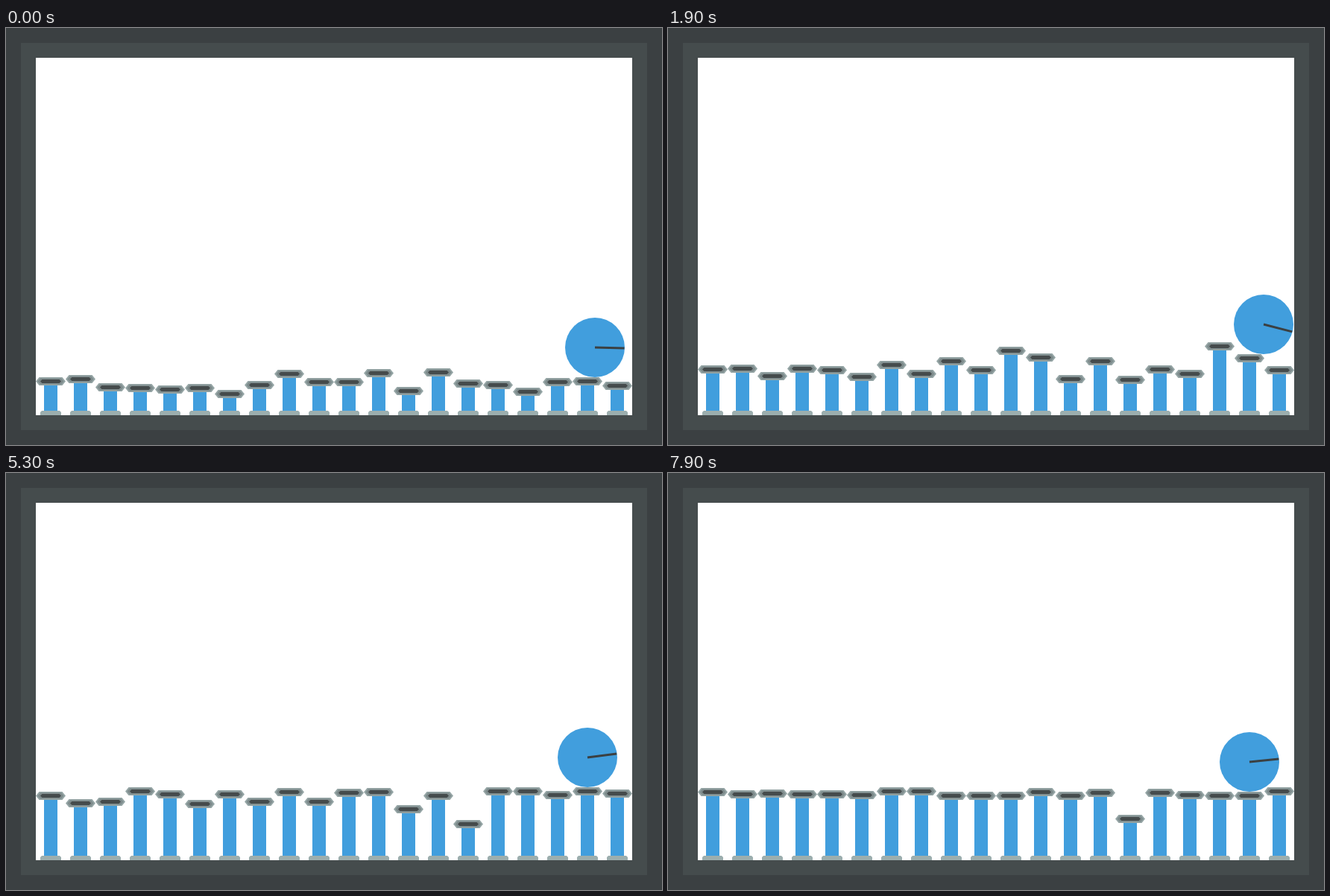
Write an HTML page that moves like this. It is 880x560 px and loops after 8 s.

```html
<!DOCTYPE html>
<html lang="en">
<head>
<meta charset="utf-8">
<title>Pistons</title>
<style>
  html, body { margin: 0; width: 100%; height: 100%; overflow: hidden; background: #3b4042; }
  svg { display: block; }
</style>
</head>
<body>
<svg width="880" height="560" viewBox="0 0 880 560">
  <defs>
    <g id="cap">
      <path d="M-20 0L-15.5 -5.5H15.5L20 0L15.5 5.5H-15.5Z" fill="#95a5a5"/>
      <path d="M-17.5 0L-14 -4H14L17.5 0L14 4H-14Z" fill="#7f8c8d"/>
      <path d="M-14 0L-11.5 -2.5H11.5L14 0L11.5 2.5H-11.5Z" fill="#454b4c"/>
    </g>
    <path id="base" d="M-14 520V516L-12 514H12L14 516V520Z" fill="#9caeae"/>
  </defs>
  <rect width="880" height="560" fill="#3b4042"/>
  <rect x="20" y="20" width="840" height="520" fill="#454c4d"/>
  <rect x="40" y="40" width="800" height="480" fill="#fff"/>
  <g id="pistons"></g>
  <g id="ball">
    <circle r="40" fill="#419edd"/>
    <path id="hand" d="M0 0H39.5" stroke="#3b4042" stroke-width="3"/>
  </g>
</svg>
<script>
const LOOP = 8, STEP = 0.1;
const FLOOR = 514, CEILING = 427, SETTLED = 430, WOBBLE = 3;
const CARRIER = 18, BALL_GAP = 45;
const byId = id => document.getElementById(id);

// Each piston starts at its own height and climbs steadily for its own time (s)
const starts = [474, 471, 482, 483, 485, 483, 491, 479, 464, 475,
                475, 463, 487, 462, 477, 479, 488, 475, 473, 480];
const climbs = [5, 7, 7.2, 4, 4.6, 7, 3.1, 7.4, 3.8, 6.4,
                2.1, 3.2, 8.5, 4, 30, 4.8, 4.6, 1.8, 3.6, 5];

// The ball rides up to the wall, then is nudged back to the middle of its piston
const path = [
  { t: 0, x: 790, y: 429, turn: 1.3 },
  { t: 0.6, x: 799, y: 413, turn: 14.5 },
  { t: 1.9, x: 799, y: 398, turn: 14.5 },
  { t: 3.6, x: 799, y: 382, turn: 14.5 },
  { t: 4.4, x: 795, y: 390, turn: 13.5 },
  { t: 5, x: 780, y: 382, turn: -7.2 },
  { t: 7.2, x: 780, y: 382, turn: -7.2 },
  { t: 7.9, x: 780, y: 388, turn: -5.8 }
];

const mix = (a, b, k) => a + (b - a) * k;

function ballAt(t) {
  const i = Math.max(1, path.findIndex(p => p.t >= t));
  const a = path[i - 1], b = path[i];
  const k = (t - a.t) / (b.t - a.t);
  return {
    x: mix(a.x, b.x, k),
    y: mix(a.y, b.y, k),
    turn: mix(a.turn, b.turn, k)
  };
}

function capY(i, t) {
  const climb = mix(starts[i], SETTLED, Math.min(1, t / climbs[i]));
  const wobble = WOBBLE * Math.sin(t * (1.5 + i * 0.618 % 1 * 2));
  return Math.max(CEILING, climb + wobble);
}

function add(parent, tag, attrs) {
  const el = document.createElementNS("http://www.w3.org/2000/svg", tag);
  for (const name in attrs) el.setAttribute(name, attrs[name]);
  return parent.appendChild(el);
}

const pistons = starts.map((_, i) => {
  const g = add(byId("pistons"), "g", { transform: `translate(${60 + i * 40} 0)` });
  const shaft = add(g, "rect", { x: -9, width: 18, fill: "#419edd" });
  add(g, "use", { href: "#base" });
  return { shaft, cap: add(g, "use", { href: "#cap" }) };
});

function draw(t) {
  const ball = ballAt(t);
  pistons.forEach(({ shaft, cap }, i) => {
    const top = i === CARRIER ? ball.y + BALL_GAP : capY(i, t);
    const y = Math.round(top) + 0.5;
    shaft.setAttribute("y", y);
    shaft.setAttribute("height", FLOOR - y);
    cap.setAttribute("y", y);
  });
  byId("ball").setAttribute("transform", `translate(${Math.round(ball.x)} ${Math.round(ball.y)})`);
  byId("hand").setAttribute("transform", `rotate(${ball.turn})`);
}

const start = performance.now();
function tick() {
  const t = (performance.now() - start) / 1000 % LOOP;
  draw(Math.floor(t / STEP) * STEP);
  requestAnimationFrame(tick);
}
tick();
</script>
</body>
</html>
```
